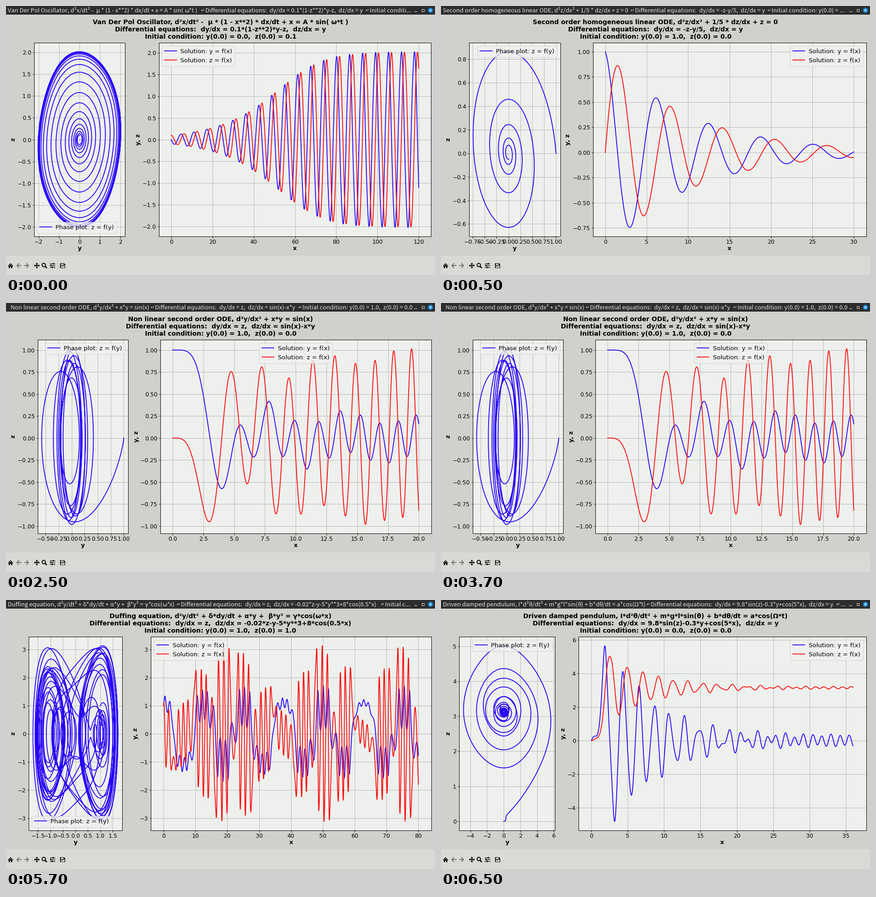
Write a matplotlib script that moves like this. It is 945x593 px and loops after 8000 ms.

```python
from itertools import groupby
from math import cos, sin

import matplotlib.pyplot as plt
import numpy as np
from matplotlib.animation import FuncAnimation
from matplotlib.patches import Circle, Polygon, Rectangle
from matplotlib.textpath import TextPath
from matplotlib.ticker import MultipleLocator

# At 72 dpi one point equals one pixel.
W, H, DPI = 945, 593, 72
TOP, BOTTOM, RIGHT = 81.5, 507.5, 936.5
BLUE, RED = "#2200fa", "#fb0808"
FACE, PANEL, TOOLBAR, BAR = "#cfd1cd", "#eef0ed", "#d8dad6", "#2d2d2d"
BAR_TEXT = "#e2e2e2"

plt.rcParams.update({
    "font.family": "DejaVu Sans", "font.size": 13.33, "toolbar": "None",
    "axes.facecolor": PANEL, "axes.linewidth": 1, "grid.color": "#b0b3b0",
    "grid.linewidth": 0.9, "lines.linewidth": 1.8, "legend.fontsize": 13.33,
    "legend.borderpad": 0.45, "legend.handletextpad": 0.63,
    "legend.labelspacing": 0.52,
})

SCENES = [
    dict(head="Van Der Pol Oscillator, d²x/dt² -  μ * (1 - x**2) * dx/dt + x = A * sin( ω*t )",
         system="dy/dx = 0.1*(1-z**2)*y-z,  dz/dx = y",
         slope=lambda x, y, z: (0.1 * (1 - z * z) * y - z, y),
         start=(0.0, 0.1), end=120, left=(61.5, 262), right=336.5, label_x=294.5,
         steps=(1, 0.5, 20, 0.5), legends=("lower left", "upper left"),
         bar=(4, 439, 801), tail="Initial conditi..."),
    dict(head="Second order homogeneous linear ODE, d²z/dx² + 1/5 * dz/dx + z = 0",
         system="dy/dx = -z-y/5,  dz/dx = y",
         slope=lambda x, y, z: (-z - y / 5, y),
         start=(1.0, 0.0), end=30, left=(61.5, 262.5), right=334.5, label_x=283.5,
         steps=(0.25, 0.2, 5, 0.25), legends=("upper right", "upper right"),
         bar=(4, 427, 728), tail="Initial condition: y(0.0) = ..."),
    dict(head="Non linear second order ODE, d²y/dx² + x*y = sin(x)",
         system="dy/dx = z,  dz/dx = sin(x)-x*y",
         slope=lambda x, y, z: (z, sin(x) - x * y),
         start=(1.0, 0.0), end=20, left=(69.5, 268.5), right=340, label_x=290.5,
         steps=(0.25, 0.25, 2.5, 0.25), legends=("upper right", "upper center"),
         bar=(10, 328, 653), tail=None),
    dict(head="Duffing equation, d²y/dt² + δ*dy/dt + α*y +  β*y³ = γ*cos(ω*x)",
         system="dy/dx = z,  dz/dx = -0.02*z-y-5*y**3+8*cos(0.5*x)",
         slope=lambda x, y, z: (z, -0.02 * z - y - 5 * y**3 + 8 * cos(0.5 * x)),
         start=(1.0, 1.0), end=80, left=(50, 256), right=319, label_x=288.5,
         steps=(0.5, 1, 10, 1), legends=("lower left", "upper left"),
         bar=(4, 385, 835), tail="Initial c..."),
    dict(head="Driven damped pendulum, I*d²θ/dt² + m*g*l*sin(θ) + b*dθ/dt = a*cos(Ω*t)",
         system="dy/dx = 9.8*sin(z)-0.3*y+cos(5*x),  dz/dx = y",
         slope=lambda x, y, z: (9.8 * sin(z) - 0.3 * y + cos(5 * x), y),
         start=(0.0, 0.0), end=36, left=(40, 251.5), right=302.5, label_x=272.5,
         steps=(2, 1, 5, 2), legends=("upper right", "upper right"),
         bar=(4, 462, 880), tail="..."),
]
# Scene shown in each half second of the loop.
TIMELINE = [0] + [1] * 4 + [2] * 4 + [3] * 4 + [4] * 3


def solve(slope, start, end, count=100_000):
    """Integrate with explicit Euler steps."""
    h = end / count
    y, z = start
    path = [start]
    for i in range(count):
        dy, dz = slope(i * h, y, z)
        y += h * dy
        z += h * dz
        path.append((y, z))
    return np.linspace(0, end, count + 1), *np.array(path).T


fig = plt.figure(figsize=(W / DPI, H / DPI), dpi=DPI, facecolor=FACE)
ui = fig.add_axes([0, 0, 1, 1], zorder=-1)
ui.set(xlim=(0, W), ylim=(H, 0))
ui.axis("off")


def rect(x, y, w, h, color, **style):
    ui.add_patch(Rectangle((x, y), w, h, fc=color, lw=0, **style))


def stroke(points, color="black", width=2.0):
    ui.plot(*zip(*points), color=color, lw=width, solid_capstyle="butt",
            solid_joinstyle="miter")


def shape(points, color="black"):
    ui.add_patch(Polygon(points, fc=color, lw=0))


def draw_window():
    rect(0, 0, W, 19, BAR)
    rect(0, 550, W, H - 550, TOOLBAR)
    stroke([(899, 11.5), (904.5, 11.5)], BAR_TEXT, 1.1)
    ui.add_patch(Rectangle((916, 7), 4.6, 4.8, fill=False, ec=BAR_TEXT, lw=1))
    ui.add_patch(Circle((935, 9.5), 5.6, fc="#1488e0", lw=0))
    for s in (-1, 1):
        stroke([(932.8, 9.5 - 2.2 * s), (937.2, 9.5 + 2.2 * s)], "white", 1.2)


def draw_toolbar():
    # home
    shape([(4, 573), (10, 567), (16, 573), (15, 574), (10, 569.2), (5, 574)])
    shape([(6, 574), (10, 570.2), (14, 574), (14, 577.8), (11.2, 577.8),
           (11.2, 574.6), (8.8, 574.6), (8.8, 577.8), (6, 577.8)])
    # back and forward
    for tip, s in ((23, 1), (50.5, -1)):
        stroke([(tip + 5.5 * s, 567.2), (tip + s, 572.2), (tip + 5.5 * s, 577.2)], "#747673")
        stroke([(tip + s, 572.2), (tip + 11 * s, 572.2)], "#747673")
    for x in (57.5, 113.5):
        stroke([(x, 565), (x, 580)], "#c3c5c1", 1)
    # pan
    for dx, dy in ((1, 0), (-1, 0), (0, 1), (0, -1)):
        def at(along, across):
            return 68 + dx * along + dy * across, 572.3 + dy * along + dx * across
        stroke([at(0, 0), at(4.5, 0)], width=1.7)
        shape([at(6.4, 0), at(3.4, 2.7), at(3.4, -2.7)])
    # zoom
    ui.add_patch(Circle((83.2, 571), 3.8, fill=False, ec="black", lw=1.9))
    stroke([(85.8, 573.6), (90, 577.8)], width=2.6)
    # sliders
    for y, knob in ((568.3, 103.5), (572.3, 99.3), (576.3, 102.3)):
        stroke([(96, y), (107.5, y)], width=1.3)
        stroke([(knob, y - 1.9), (knob, y + 1.9)], width=1.6)
    # save
    shape([(119.2, 567), (127.8, 567), (130.3, 569.5), (130.3, 577.8), (119.2, 577.8)])
    rect(120.8, 568.2, 6, 2.6, TOOLBAR)
    rect(120.8, 572.2, 8, 4.4, TOOLBAR)
    rect(122.2, 573.4, 5.2, 1, "black")


def advance(text, family, size):
    def width(s):
        return TextPath((0, 0), s, size=size, prop={"family": family}).get_extents().width
    return width(f"|{text}|") - width("||")


def bar_text(x, text):
    """Set a line of the title bar, with Greek letters in their own font."""
    parts = []
    for greek, run in groupby(text, lambda c: "\u0370" <= c <= "\u03ff"):
        run = "".join(run)
        family, size = ("DejaVu Sans", 12.4) if greek else ("Noto Sans CJK JP", 13.05)
        parts.append(ui.text(x, 14, run, family=family, size=size, color=BAR_TEXT))
        x += advance(run, family, size)
    return parts


def bold(x, y, text, size=13.33, rotation=0):
    return ui.text(x, y, text, size=size, weight="bold", ha="center", va="baseline",
                   rotation=rotation, rotation_mode="anchor")


def panel(x0, x1, x_step, y_step):
    ax = fig.add_axes([x0 / W, 1 - BOTTOM / H, (x1 - x0) / W, (BOTTOM - TOP) / H])
    ax.grid(True)
    ax.tick_params(length=3.5, width=0.9, pad=2.5, labelsize=12.4)
    ax.xaxis.set_major_locator(MultipleLocator(x_step))
    ax.yaxis.set_major_locator(MultipleLocator(y_step))
    return ax


def build(scene):
    xs, ys, zs = solve(scene["slope"], scene["start"], scene["end"])
    left, steps = scene["left"], scene["steps"]
    phase = panel(*left, *steps[:2])
    phase.plot(ys, zs, color=BLUE, label="Phase plot: z = f(y)")
    graph = panel(scene["right"], RIGHT, *steps[2:])
    graph.plot(xs, ys, color=BLUE, label="Solution: y = f(x)")
    graph.plot(xs, zs, color=RED, label="Solution: z = f(x)")
    for ax, loc in zip((phase, graph), scene["legends"]):
        ax.legend(loc=loc)

    y0, z0 = scene["start"]
    lines = (scene["head"], "Differential equations:  " + scene["system"],
             f"Initial condition: y(0.0) = {y0},  z(0.0) = {z0}")
    artists = [phase, graph]
    artists += [bold(472.5, 40.3 + 15.65 * i, s, 14) for i, s in enumerate(lines)]
    artists += [bold(sum(left) / 2, 538.4, "y"),
                bold((scene["right"] + RIGHT) / 2, 538.4, "x"),
                bold(19.5, 294.5, "z", rotation=90),
                bold(scene["label_x"], 294.5, "y, z", rotation=90)]
    for x, s in zip(scene["bar"], (*lines[:2], scene["tail"] or lines[2])):
        artists += bar_text(x, s)
    artists += [ui.text(x - 9.5, 13.5, "↵", size=9.5, color=BAR_TEXT)
                for x in scene["bar"][1:]]
    return artists


draw_window()
draw_toolbar()
stages = [build(scene) for scene in SCENES]


def update(frame):
    for i, artists in enumerate(stages):
        for artist in artists:
            artist.set_visible(i == TIMELINE[frame])
    return []


update(0)
anim = FuncAnimation(fig, update, frames=len(TIMELINE), interval=500,
                     repeat=True, repeat_delay=0, blit=False)
plt.show()
```
